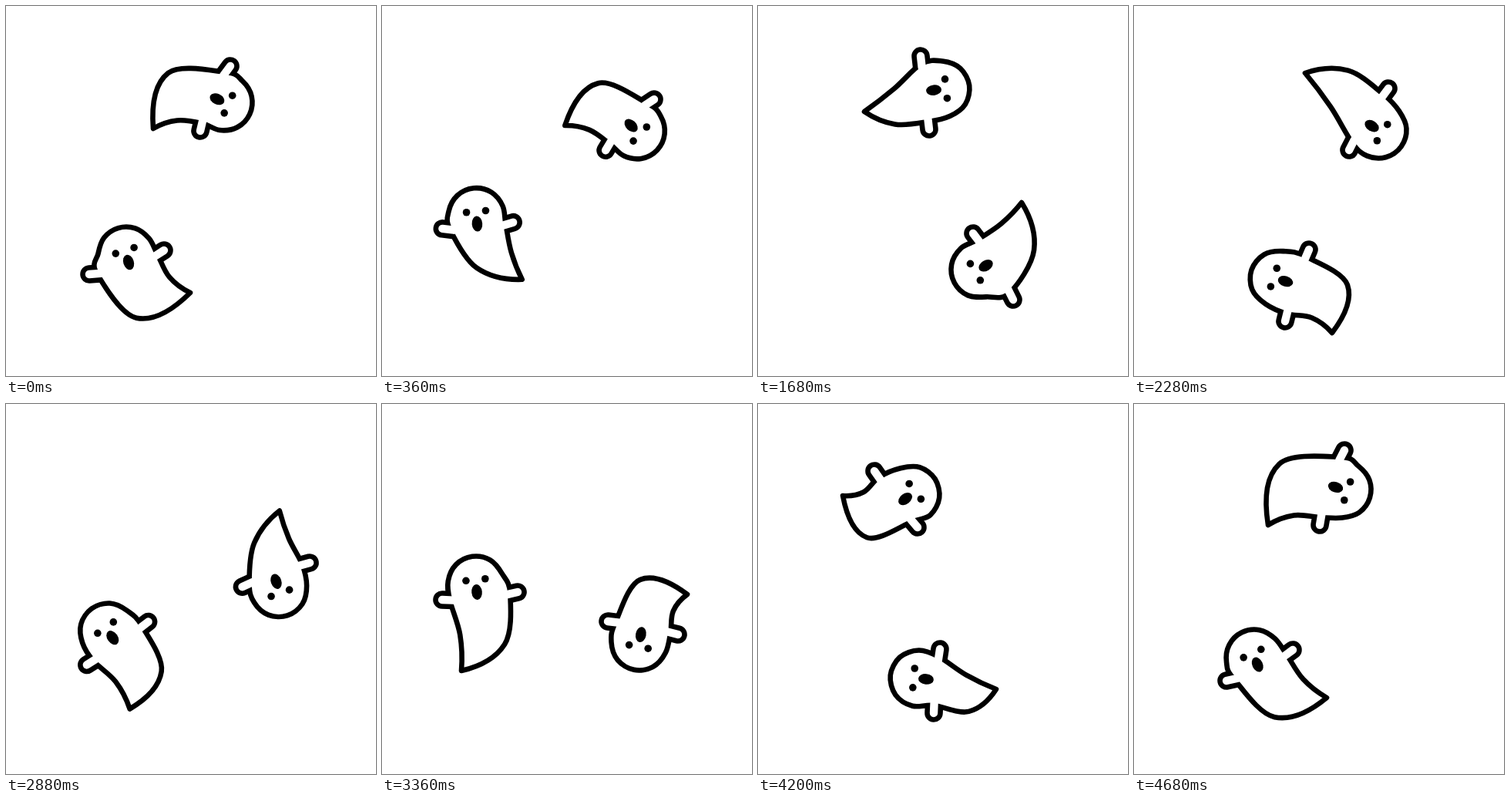
An HTML page with a canvas that plays this animation: 480x480 px, repeating every 4800 ms.

```html
<!DOCTYPE html>
<html lang="en">
<head>
<meta charset="utf-8">
<title>Circling ghosts</title>
<style>
  html, body { margin: 0; width: 100%; height: 100%; overflow: hidden; background: #fff; }
  canvas { display: block; width: 480px; height: 480px; }
</style>
</head>
<body>
<canvas id="stage" width="480" height="480"></canvas>
<script>
const ctx = document.getElementById('stage').getContext('2d');
const STEP = 120, STEPS = 40, MID = 240;
const LINE = 6.6, ARM = 17, HEAD = 36.5;
const POSE_STEPS = [0, 7, 14, 19, 28, 35, 39];

// Each pose: head, left arm, right arm, tail tip, bend
const GHOSTS = [
  [
    [283,125, 291,78, 252,162, 191,159, -45],
    [355,235, 393,208, 307,242, 285,183, -38],
    [287,342, 331,381, 279,295, 342,255, -24],
    [187,354, 196,409, 227,316, 257,424, 39],
    [122,234, 78,254, 176,244, 103,346, 29],
    [199,117, 151,87, 207,160, 110,119, 40],
    [271,111, 273,60, 241,157, 174,157, -48]
  ],
  [
    [156,323, 108,348, 205,317, 239,372, -46],
    [123,190, 76,202, 165,216, 130,298, 12],
    [238,108, 211,65, 222,160, 138,137, 10],
    [317,161, 330,107, 279,187, 222,87, -18],
    [334,309, 384,299, 293,282, 396,247, 40],
    [208,356, 228,401, 236,318, 309,370, -19],
    [156,329, 120,359, 206,319, 250,381, -38]
  ]
];

const turn = step => step / STEPS * 2 * Math.PI;
const polar = ([x, y], r, angle) => [x + r * Math.cos(angle), y + r * Math.sin(angle)];
const angleOf = (a, b) => Math.atan2(b[1] - a[1], b[0] - a[0]);

function spin([x, y], angle) {
  const c = Math.cos(angle), s = Math.sin(angle), dx = x - MID, dy = y - MID;
  return [MID + dx * c - dy * s, MID + dx * s + dy * c];
}

// Blend neighbouring poses in a frame that turns with the orbit
function poseAt(poses, step) {
  let i = POSE_STEPS.length - 1;
  while (POSE_STEPS[i] > step) i--;
  const j = (i + 1) % POSE_STEPS.length;
  const from = POSE_STEPS[i], to = POSE_STEPS[j] || STEPS;
  const k = (step - from) / (to - from);
  const mix = (a, b) => a + (b - a) * k;
  const points = [];
  for (let n = 0; n < 8; n += 2) {
    const a = spin(poses[i].slice(n, n + 2), -turn(from));
    const b = spin(poses[j].slice(n, n + 2), -turn(to));
    points.push(spin([mix(a[0], b[0]), mix(a[1], b[1])], turn(step)));
  }
  return { points, bend: mix(poses[i][8], poses[j][8]) };
}

// Smooth curve through the points, sharp where its two ends meet
function smooth(pts) {
  const last = pts.length - 1;
  const slope = (n, axis) => {
    if (n === 0) return 2 * (pts[1][axis] - pts[0][axis]) - slope(1, axis);
    if (n === last) return 2 * (pts[n][axis] - pts[n - 1][axis]) - slope(n - 1, axis);
    return (pts[n + 1][axis] - pts[n - 1][axis]) / 2;
  };
  const path = new Path2D();
  path.moveTo(...pts[0]);
  for (let n = 0; n < last; n++) {
    const p = pts[n], q = pts[n + 1];
    path.bezierCurveTo(
      p[0] + slope(n, 0) / 3, p[1] + slope(n, 1) / 3,
      q[0] - slope(n + 1, 0) / 3, q[1] - slope(n + 1, 1) / 3, q[0], q[1]);
  }
  path.closePath();
  return path;
}

function bar(a, b, width, color) {
  ctx.strokeStyle = color;
  ctx.lineWidth = width;
  ctx.beginPath();
  ctx.moveTo(...a);
  ctx.lineTo(...b);
  ctx.stroke();
}

function blob([x, y], rx, ry, angle) {
  ctx.beginPath();
  ctx.ellipse(x, y, rx, ry, angle, 0, 2 * Math.PI);
  ctx.fill();
}

// Point beside the middle of the line from an arm to the tail
function side(base, tail, bulge) {
  const middle = [(base[0] + tail[0]) / 2, (base[1] + tail[1]) / 2];
  return polar(middle, bulge, angleOf(base, tail) - Math.PI / 2);
}

function drawGhost({ points: [head, armL, armR, tail], bend }) {
  const heading = angleOf(armL, armR) - Math.PI / 2;
  const chest = polar(head, -22, heading);
  const arms = [armL, armR];
  const reach = (arm, d) => polar(arm, d, angleOf(arm, chest));
  const [baseL, baseR] = arms.map(arm => reach(arm, 10));

  // The outer flank takes the whole bend, the inner one a little
  const sideL = side(baseL, tail, bend < 0 ? bend : bend * 0.2);
  const sideR = side(baseR, tail, bend > 0 ? bend : bend * 0.16);

  const start = angleOf(head, baseL);
  const sweep = (angleOf(head, baseR) - start + 4 * Math.PI) % (2 * Math.PI);
  const crown = [];
  for (let n = 1; n < 6; n++) crown.push(polar(head, HEAD, start + sweep * n / 6));
  const body = smooth([tail, sideL, baseL, ...crown, baseR, sideR, tail]);

  for (const arm of arms) bar(arm, reach(arm, 14), ARM + LINE, '#000');
  ctx.fillStyle = '#fff';
  ctx.strokeStyle = '#000';
  ctx.lineWidth = LINE;
  ctx.fill(body);
  ctx.stroke(body);
  for (const arm of arms) bar(arm, reach(arm, 15), ARM - LINE, '#fff');

  const brow = polar(head, 6, heading);
  ctx.fillStyle = '#000';
  blob(polar(brow, -12.5, heading + Math.PI / 2), 4.8, 4.8, 0);
  blob(polar(brow, 12.5, heading + Math.PI / 2), 4.8, 4.8, 0);
  blob(polar(head, -10, heading), 10, 6.8, heading);
}

function draw(now) {
  const step = Math.floor(now / STEP) % STEPS;
  ctx.fillStyle = '#fff';
  ctx.fillRect(0, 0, 480, 480);
  ctx.lineCap = ctx.lineJoin = 'round';
  for (const poses of GHOSTS) drawGhost(poseAt(poses, step));
}

function tick() {
  draw(performance.now());
  requestAnimationFrame(tick);
}
tick();
</script>
</body>
</html>
```
